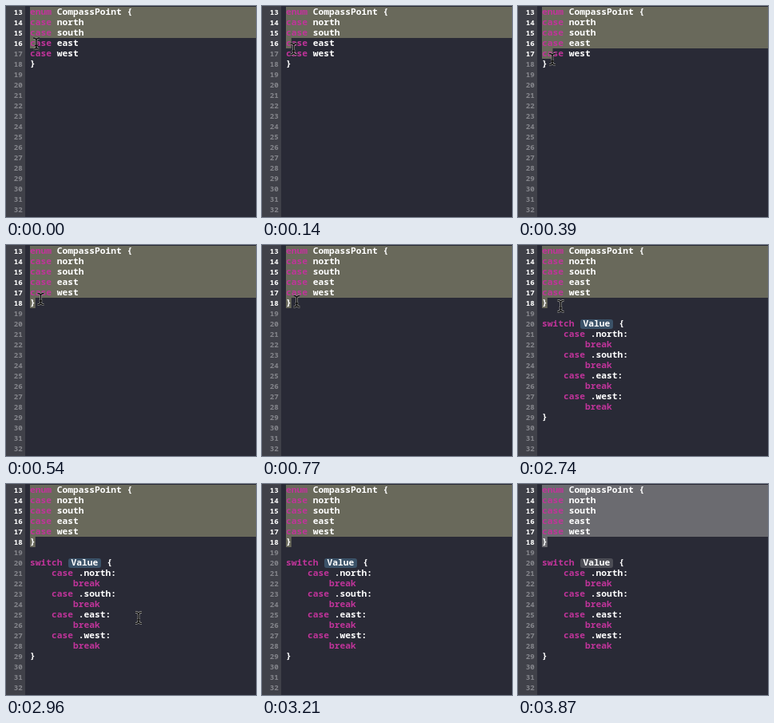
Recreate the animation shown at these times as an HTML page. Size 313 px wide and 264 px high, loop 3.97 s.

```html
<!DOCTYPE html>
<html lang="en">
<head>
<meta charset="utf-8">
<title>Enum to switch</title>
<style>
  html, body { margin: 0; width: 100%; height: 100%; overflow: hidden; background: #292a36; }
  svg { display: block; }
  text { font: 600 11.25px "Noto Sans Mono", "DejaVu Sans Mono", monospace; fill: #fff; white-space: pre; }
  .keyword { fill: #c0349a; }
  .number { font-size: 9.2px; fill: #85868c; text-anchor: end; }
  .number.on { fill: #fff; }
  #cursor path { fill: none; stroke: #a9a9a6; stroke-width: 2.6; }
  #cursor path + path { stroke: #0c0c0c; stroke-width: 1.4; }
</style>
</head>
<body>
<svg id="stage" width="313" height="264" viewBox="0 0 313 264">
  <rect width="313" height="264" fill="#292a36"/>
  <rect width="24" height="264" fill="#404149"/>
  <path id="selection"/>
  <g id="numbers"></g>
  <g id="code"></g>
  <g id="switch"><rect id="token" x="78" y="93" width="41" height="12" rx="3"/></g>
  <g id="cursor">
    <path d="M-4-7Q0-7 0-4Q0-7 4-7M0-4.5V4.5M-2 2.5H2M-4 7Q0 7 0 4Q0 7 4 7"/>
    <path d="M-4-7Q0-7 0-4Q0-7 4-7M0-4.5V4.5M-2 2.5H2M-4 7Q0 7 0 4Q0 7 4 7"/>
  </g>
</svg>
<script>
const LOOP = 3970, ROW = 13, LEFT = 30, CHAR = 6.75, FIRST = 13;
const $ = id => document.getElementById(id);

function addText(parent, x, y, content, className = '') {
  const node = document.createElementNS('http://www.w3.org/2000/svg', 'text');
  node.setAttribute('x', x);
  node.setAttribute('y', y);
  node.setAttribute('class', className);
  node.textContent = content;
  parent.append(node);
  return node;
}

// Splits a line into an optional leading keyword and the rest.
function addLine(parent, number, line) {
  const [, indent, keyword, rest] = line.match(/^(\s*)(enum|case|switch|break)?(.*)$/);
  const y = 11 + (number - FIRST) * ROW;
  const x = LEFT + indent.length * CHAR;
  if (keyword) addText(parent, x, y, keyword, 'keyword');
  if (rest) addText(parent, x + (keyword || '').length * CHAR, y, rest);
}

const cases = ['north', 'south', 'east', 'west'];
['enum CompassPoint {', ...cases.map(c => 'case ' + c), '}']
  .forEach((line, i) => addLine($('code'), FIRST + i, line));

addLine($('switch'), 20, 'switch');
addText($('switch'), 81.5, 102, 'Value');
addText($('switch'), 126.2, 102, '{');
[...cases.flatMap(c => [`    case .${c}:`, '        break']), '}']
  .forEach((line, i) => addLine($('switch'), 21 + i, line));

const numbers = Array.from({ length: 21 }, (_, i) =>
  addText($('numbers'), 20.7, 10.5 + i * ROW, FIRST + i, 'number'));

// Pointer path: time, x, y
const path = [
  [0, 38, 47], [20, 38, 47.5], [390, 43, 66.5], [480, 43, 66.5], [540, 43.5, 67.5],
  [620, 43.5, 72], [770, 43.5, 72], [770, 43.5, 70.5], [2740, 43.5, 70.5],
  [2740, 53, 76], [3180, 278, 258], [LOOP, 278, 290]
];

function pointerAt(t) {
  const i = path.findIndex(p => p[0] > t);
  const [t0, x0, y0] = path[i - 1], [t1, x1, y1] = path[i];
  const u = (t - t0) / (t1 - t0);
  return [x0 + (x1 - x0) * u, y0 + (y1 - y0) * u];
}

function draw(t) {
  const [x, y] = pointerAt(t);
  const active = t < 3870;
  const row = Math.min(5, Math.floor((y - 2) / ROW));
  const chars = row === 5 ? 1 : Math.round((x - LEFT) / CHAR);
  const top = 1 + row * ROW;

  $('selection').setAttribute('d',
    `M${LEFT} 1H313V${top}H${LEFT + chars * CHAR}v${ROW}H${LEFT}Z`);
  $('selection').setAttribute('fill', active ? '#69695b' : '#6b6b70');
  $('token').setAttribute('fill', active ? '#3b5268' : '#4d4e56');
  numbers.forEach((n, i) => n.classList.toggle('on', i <= row));
  $('switch').style.display = t < 1720 ? 'none' : '';
  $('cursor').style.display = t < 3210 ? '' : 'none';
  $('cursor').setAttribute('transform', `translate(${x} ${y})`);
}

const start = performance.now();
function tick() {
  draw((performance.now() - start) % LOOP);
  requestAnimationFrame(tick);
}
tick();
</script>
</body>
</html>
```
